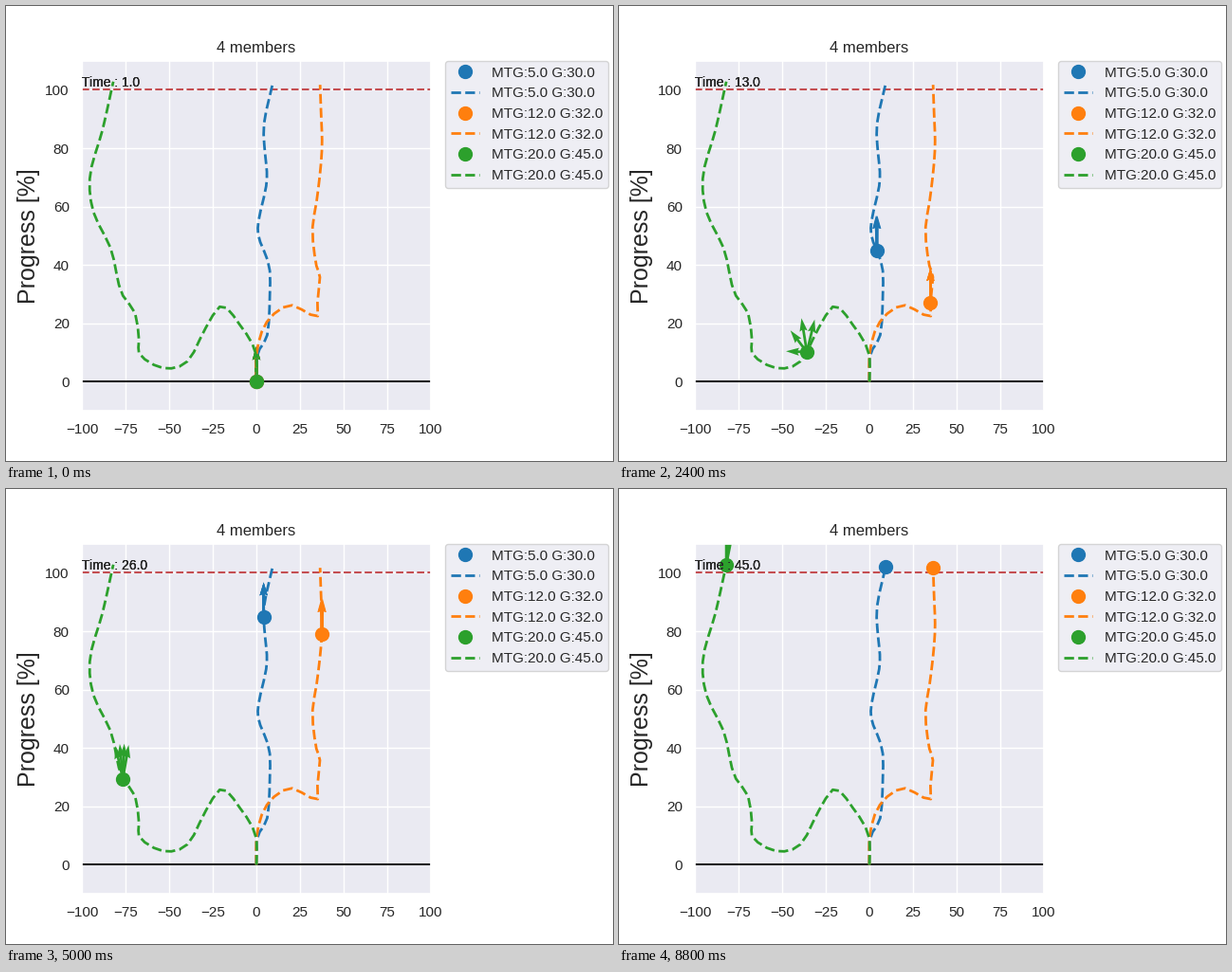
Recreate the animation shown at these times as a matplotlib script. Size 640 by 480 pixels, loop 9000 ms.

```python
import matplotlib.pyplot as plt
import numpy as np
from matplotlib.animation import FuncAnimation

STEPS = 45
ARROW = 12
MEMBERS = 4
DARK = "0.15"

plt.rcParams.update({
    "font.family": "Liberation Sans",
    "text.color": DARK,
    "axes.labelcolor": DARK,
    "axes.facecolor": "#EAEAF2",
    "axes.edgecolor": "white",
    "axes.linewidth": 1.25,
    "axes.axisbelow": True,
    "axes.grid": True,
    "grid.color": "white",
    "grid.linewidth": 1,
    "grid.linestyle": "-",
    "xtick.color": DARK,
    "ytick.color": DARK,
    "xtick.labelsize": 11,
    "ytick.labelsize": 11,
    "xtick.major.size": 6,
    "ytick.major.size": 6,
    "xtick.bottom": False,
    "ytick.left": False,
})

# Route: (time, x, y) key points.
# Fans: (lean, spread) in degrees reached by the end of each meeting period.
BLUE = dict(
    color="#1f77b4", meeting=5, fans=[(1, 3)] * 5 + [(23, 45)],
    route=[(1, 0, 0), (3, 0.2, 8.5), (6, 6.2, 16), (9, 7.7, 29.7),
           (11, 7.7, 38), (15, 1, 50.5), (17, 1.2, 55), (20, 5.6, 67),
           (22, 6, 72), (24, 5, 78), (27, 4.4, 88.5), (30, 9.3, 102)])

ORANGE = dict(
    color="#ff7f0e", meeting=12, fans=[(-31, 36), (-30, 30), (-2, 17)],
    route=[(1, 0, 0), (3, 0, 9), (6, 6, 20.5), (9, 20.5, 26.2), (11, 31, 23),
           (12, 35.2, 22.5), (13, 35, 27), (15, 36.4, 35.8), (17, 34.4, 39.7),
           (20, 32.2, 53), (22, 34.5, 61.8), (26, 37.5, 79), (30, 37, 93),
           (32, 36.5, 101.7)])

GREEN = dict(
    color="#2ca02c", meeting=20, fans=[(40, 66), (6, 46), (-28, 28)],
    route=[(1, 0, 0), (3, 0, 9), (6, -9.5, 19.5), (9, -21, 25.7),
           (11, -29, 18.5), (14, -39.5, 7), (17, -53.5, 4.7),
           (20, -67.3, 9.8), (22, -67.3, 14.3), (24, -69.5, 23.5),
           (26, -76.5, 29.5), (30, -83.7, 46), (33, -93.3, 58),
           (36, -95.5, 69.5), (40, -88.3, 86), (45, -82, 102.8)])


def smooth(time, t, v):
    """Cubic Hermite curve through the values v at the times t."""
    slope = np.gradient(v, t)
    i = np.clip(np.searchsorted(t, time, "right") - 1, 0, len(t) - 2)
    h = t[i + 1] - t[i]
    u = (time - t[i]) / h
    ease = u * u * (3 - 2 * u)
    return (v[i] + (v[i + 1] - v[i]) * ease
            + h * u * (1 - u) * (slope[i] * (1 - u) - slope[i + 1] * u))


def headings(t, meeting, fans):
    """All members point up at a meeting, then fan out until the next one."""
    period, since = divmod(t - 1, meeting)
    lean, spread = fans[period]
    grown = np.sin(np.pi / 2 * since / (meeting - 1))
    fan = lean + spread * np.linspace(1, -1, MEMBERS)
    return np.radians(90 + grown * fan)


class Team:
    def __init__(self, ax, color, meeting, fans, route):
        self.meeting, self.fans = meeting, fans
        t, x, y = np.array(route, float).T
        self.goal = int(t[-1])
        time = np.arange(1, self.goal + 1)
        self.x, self.y = smooth(time, t, x), smooth(time, t, y)

        label = f"MTG:{meeting:.1f} G:{self.goal:.1f}"
        self.dot, = ax.plot([0], [0], "o", ms=10, color=color, label=label,
                            zorder=2.1)
        ax.plot(self.x, self.y, "--", lw=2, color=color, label=label)
        zero = np.zeros(MEMBERS)
        self.arrows = ax.quiver(zero, zero, zero, zero + ARROW, color=color,
                                angles="xy", scale_units="xy", scale=1)

    def move(self, t):
        now = min(t, self.goal)
        spot = self.x[now - 1], self.y[now - 1]
        angle = headings(now, self.meeting, self.fans)
        self.dot.set_data([spot[0]], [spot[1]])
        self.arrows.set_visible(t <= self.goal)
        self.arrows.set_offsets([spot] * MEMBERS)
        self.arrows.set_UVC(ARROW * np.cos(angle), ARROW * np.sin(angle))


fig, ax = plt.subplots(figsize=(6.4, 4.8), dpi=100)
fig.subplots_adjust(left=0.125, right=0.7, bottom=0.11, top=0.88)
ax.set(xlim=(-100, 100), ylim=(-10, 110),
       xticks=range(-100, 101, 25), yticks=range(0, 101, 20))
ax.set_title("4 members", fontsize=12)
ax.set_ylabel("Progress [%]", fontsize=18)
ax.hlines(0, -100, 100, color="0.1", lw=1.5, zorder=1.5)
ax.hlines(100, -100, 100, color="#c44e52", lw=1.5, ls="--", zorder=1.5)

teams = [Team(ax, **spec) for spec in (BLUE, ORANGE, GREEN)]
# One clock per team, stacked on the same spot.
clocks = [ax.text(-100, 101, "", fontsize=10) for _ in teams]
ax.legend(loc="upper left", bbox_to_anchor=(1.04, 1), borderaxespad=0,
          fontsize=11, facecolor="#EAEAF2", edgecolor="0.8", framealpha=0.8)


def update(frame):
    t = frame + 1
    for team, clock in zip(teams, clocks):
        team.move(t)
        clock.set_text(f"Time : {t:.1f}")
    return []


anim = FuncAnimation(fig, update, frames=STEPS, interval=200, repeat=True,
                     repeat_delay=0, blit=False)
plt.show()
```
